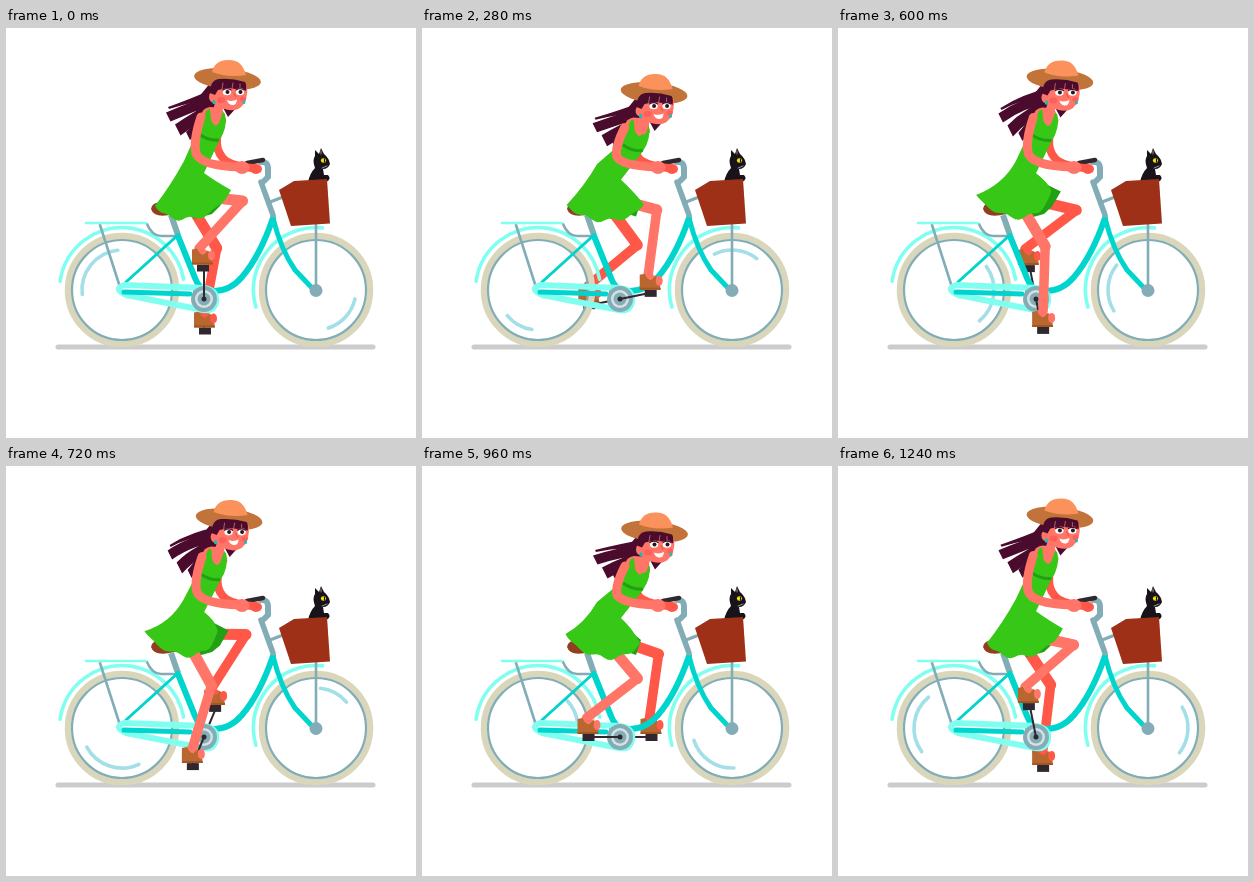
An HTML page with a canvas for the animation above (1280 ms loop, 410 px wide and 410 px high).

```html
<!DOCTYPE html>
<html>
<head>
<meta charset="utf-8">
<style>
html, body { margin: 0; width: 100%; height: 100%; overflow: hidden; background: #fff; }
canvas { display: block; }
</style>
</head>
<body>
<canvas id="stage" width="410" height="410"></canvas>
<script>
const ctx = document.getElementById('stage').getContext('2d');
const LOOP = 1280, STEP = 40, TAU = Math.PI * 2;
const TEAL = '#00d5cd', AQUA = '#80fff0', STEEL = '#82adb6', DARK = '#30272f';
const SKIN = '#ff7668', FAR_SKIN = '#ff5748', GREEN = '#37c716', SHADE = '#20a012';
const HAIR = '#4b0b2c', BROWN = '#b9672f';
const hub = { x: 198, y: 271 };

function fill(color, d) {
  ctx.fillStyle = color;
  ctx.fill(new Path2D(d));
}
function line(color, width, d, cap = 'round') {
  ctx.strokeStyle = color;
  ctx.lineWidth = width;
  ctx.lineCap = cap;
  ctx.lineJoin = 'round';
  ctx.stroke(new Path2D(d));
}
function oval(color, x, y, rx, ry = rx, turn = 0) {
  ctx.fillStyle = color;
  ctx.beginPath();
  ctx.ellipse(x, y, rx, ry, turn, 0, TAU);
  ctx.fill();
}
function arc(color, width, x, y, r, from, to) {
  ctx.strokeStyle = color;
  ctx.lineWidth = width;
  ctx.lineCap = 'round';
  ctx.beginPath();
  ctx.arc(x, y, r, from * TAU / 360, to * TAU / 360);
  ctx.stroke();
}
function shifted(x, y, draw) {
  ctx.save();
  ctx.translate(x, y);
  draw();
  ctx.restore();
}
const wave = (t, period, peak = 0) => Math.cos(TAU * (t - peak) / period);

function wheel(x, end, length) {
  arc('#d9d6bc', 6.5, x, 262, 54, 0, 360);
  arc(STEEL, 2.2, x, 262, 50, 0, 360);
  arc('#a3dfe8', 3.6, x, 262, 40, end - length, end);
}

// Two-bone leg: the ankle follows the pedal, the knee bends forward.
function leg(angle, hipX, hipY, color) {
  const thigh = 61, shin = 64.5, crank = 31.5;
  const px = hub.x + crank * Math.sin(angle), py = hub.y - crank * Math.cos(angle);
  const ax = px - 2 - 3 * Math.cos(angle), ay = py - 19;
  const dx = ax - hipX, dy = ay - hipY, dist = Math.hypot(dx, dy);
  const bend = Math.acos((thigh ** 2 + dist ** 2 - shin ** 2) / (2 * thigh * dist));
  const dir = Math.atan2(dy, dx) - bend;
  const kx = hipX + thigh * Math.cos(dir), ky = hipY + thigh * Math.sin(dir);
  line(DARK, 2, `M${hub.x} ${hub.y}L${px} ${py}`);
  line(color, 11, `M${hipX} ${hipY}L${kx} ${ky}`);
  line(color, 9.5, `M${kx} ${ky}L${ax} ${ay}`);
  shifted(px - Math.cos(angle), py, () => {
    fill(DARK, 'M-6 -3H6V4H-6Z');
    line(color, 9, 'M-3 -16L5 -11');
    fill(BROWN, 'M-11 -3L-11 -18L-6 -19Q-3 -12 1 -13L5 -17Q9 -12 10 -3Z');
    oval(color, 8.5, -12, 3.5, 5);
    line('#a25525', 2, 'M-10 -4H9');
  });
}

function bike() {
  arc(AQUA, 3.6, 116, 262, 62.5, 188, 350);
  arc(AQUA, 3.6, 310, 262, 62.5, 164, 276);
  line(STEEL, 2.6, 'M94 197L113 256M141 196Q146 208 155 208H168M310 196V262');
  line(AQUA, 2.6, 'M80 195H140');
  line(STEEL, 6, 'M165 187L172 207', 'butt');
  line(TEAL, 3, 'M120 254L172 207');
  line(TEAL, 6, 'M172 208L189 250Q193 261 202 263');
  line(TEAL, 6, 'M267 190Q254 228 236 249Q224 263 208 263H190');
  line(TEAL, 5, 'M267 190Q275 222 289 242L307 261');
  oval(STEEL, 310, 262.5, 6.5);
  line(STEEL, 3, 'M264 174L277 169');
  line(STEEL, 5.5, 'M255 154L267 187');
  line(STEEL, 6, 'M255 134Q262 133 262 141V149L258 153');
  line(DARK, 4.5, 'M241 135L257 132');
  fill('#91401f', 'M145 181Q146 174 156 174L184 178Q182 186 168 186Q148 191 145 181Z');
  line(AQUA, 6, 'M118 257L198 260Q212 262 210 274Q208 284 197 282L120 267Q107 261 118 257Z');
  line(TEAL, 5, 'M118 264L184 266');
  oval(STEEL, hub.x, hub.y, 13);
  oval('#d6e1e3', hub.x, hub.y, 9);
  oval(STEEL, hub.x, hub.y, 6.5);
  oval(DARK, hub.x, hub.y, 2.5);
}

function catInBasket() {
  fill('#18131b', 'M302 154Q304 145 309 140Q306 132 309 128V122L313 126L315 120L318 126Q323 130 324 136Q322 141 317 141L318 147H322Q326 151 320 154Z');
  line('#d8a49b', .8, 'M315 123V126');
  oval('#f5e600', 317.5, 132.5, 2.6, 2.2);
  line('#18131b', 1.2, 'M318.5 131V134');
  line('#eee', .6, 'M321 138L316 140');
  fill('#9d3016', 'M273 162L288 153L321 151L324 195.5L285 198Z');
}

function hair(t, u, hx, hy) {
  const swing = -3.2 * (1 - wave(t, 640)) + 3 * wave(t, LOOP, 320);
  const curl = 7 * Math.max(0, wave(t, LOOP, 720));
  // Each lock: tip x, tip y, tip thickness, root y.
  const locks = [[162, 80, 2, 64], [160, 89, 9, 69], [169, 102, 11, 76], [180, 108, 8, 82]];
  shifted(hx, hy, () => {
    for (const [x, y, w, root] of locks) {
      const ty = y + swing, mx = (x + 207) / 2, my = (ty + root) / 2 - curl;
      fill(HAIR, `M212 ${root - 5}Q${mx} ${my - w / 2} ${x} ${ty - w / 2}` +
        `L${x + w / 2} ${ty + w / 2}Q${mx + 4} ${my + w / 2} 212 ${root + 6}Z`);
    }
    fill(HAIR, 'M205 54L192 70L190 85L205 84L214 70ZM214 74L231 79L222 89Z');
  });
}

function skirtHem(t, front, back) {
  let d = '';
  for (let i = 1; i <= 24; i++) {
    const p = i / 24, q = 1 - p;
    const ripple = 2.2 * Math.sin(p * TAU * 3.5 + t / LOOP * TAU) * Math.sin(p * Math.PI);
    const at = (a, b, c, e) => q ** 3 * a + 3 * q * q * p * b + 3 * q * p * p * c + p ** 3 * e;
    d += `L${at(front[0], 205, 160, back[0])} ${at(front[1], 200, 196, back[1]) + ripple}`;
  }
  return d;
}

function dress(t, u) {
  const x = 8 * u, y = 11 * u;
  const back = [143.5 + 5.5 * wave(t, LOOP), 172 + 7 * wave(t, LOOP, 120)];
  const front = [225 - 3 * u - 13 * Math.max(0, wave(t, LOOP, 700)), 162 + 15 * u];
  shifted(x, y, () => {
    fill(SKIN, 'M195 88Q196 80 204 79L216 80L220 91L214 102H200Z');
  });
  fill(GREEN, `M${201 + x} ${82 + y}L${204 + x} ${81 + y}L${205 + x} ${92 + y}` +
    `Q${209 + x} ${101 + y} ${213 + x} ${95 + y}L${217 + x} ${84 + y}` +
    `L${219 + x} ${86 + y}Q${222 + x} ${100 + y} ${213 + x} ${113 + y}L${198 + u} ${145 + 7 * u}` +
    `Q${209 + u} ${153 + 9 * u} ${front[0]} ${front[1]}` + skirtHem(t, front, back) +
    `Q${165 - 2 * u} 157 ${178 - 3 * u} ${133 + 3 * u}L${190 + x} ${106 + y}Z`);
  line(SHADE, 3, `M${193 + x} ${106 + y}Q${202 + x} ${113 + y} ${213 + x} ${112 + y}`, 'butt');
}

function head() {
  oval('#c1733a', 221.5, 51, 33.5, 10.5, .1);
  fill('#fb925b', 'M206 44Q209 32 222 32Q236 31 240 47Q222 50 206 44Z');
  line(SKIN, 9, 'M214 74L210 88');
  fill(SKIN, 'M206 56L241 57Q243 73 234 80Q226 85 214 79L207 72Z');
  oval(SKIN, 207.5, 69, 4.5, 5.5);
  oval('#ff5f58', 215, 72, 4, 3);
  oval('#ff5f58', 237, 71, 3, 2.5);
  fill(HAIR, 'M204 65Q204 52 213 51Q226 50 239 54Q241 57 240 63L236 60L230 61L222 60L212 62L209 67Z');
  line('#c4776f', .8, 'M217 55L216 61M227 55L226 61M234 56V61');
  for (const x of [221, 234]) {
    oval('#fff', x, 64, 4.2, 3.3);
    oval('#241822', x + .5, 64, 2);
    line(HAIR, 1.2, `M${x - 4} 62Q${x} 59.5 ${x + 4} 62`);
  }
  line('#e94d42', 1, 'M228 65L230 69');
  fill('#fff', 'M221 72Q226 74 231 71.5Q230.5 77.5 226 77Q222 76.5 221 72Z');
  oval('#26b8b6', 208, 74, 1.7, 2.2);
  oval('#26b8b6', 238, 74, 1.5, 2);
}

function draw(t) {
  const u = (1 - wave(t, 640)) / 2;
  const crank = TAU * t / LOOP, spin = 1080 * t / LOOP;
  const sx = 8 * u, sy = 11 * u;
  const hx = 11 * u, hy = 14.5 * u;
  ctx.fillStyle = '#fff';
  ctx.fillRect(0, 0, 410, 410);
  line('#ccc', 5, 'M52 319H367');

  leg(crank + Math.PI, 179, 168, FAR_SKIN);
  wheel(116, 264 + spin, 64 + 27 * wave(t, 640, 20));
  wheel(310, 72 + spin, 67 + 27 * wave(t, 640, 450));
  bike();
  catInBasket();

  hair(t, u, hx, hy);
  line(FAR_SKIN, 8, `M${216 + sx} ${93 + sy}Q${204 + sx / 2} ${120 + sy / 2} 220 133Q230 139 247 140`);
  oval(FAR_SKIN, 250, 141, 6, 5);

  const tipX = 223 - 4 * u, tipY = 163 + 11 * u;
  fill(SHADE, `M196 ${150 + 5 * u}L${tipX} ${tipY}L214 ${tipY + 15}L206 186L188 191L184 180Z`);
  leg(crank, 176, 166, SKIN);
  dress(t, u);
  line(SKIN, 9, `M${195 + sx} ${89 + sy}Q${187 + sx * .8} ${113 + sy * .5} ${190 + sx * .6} ${125 + sy * .3}` +
    `Q${194 + sx * .6} 138 235 139`);
  oval(SKIN, 236, 139.5, 7.5, 6.5);
  shifted(hx, hy, head);
}

function tick(now) {
  draw(Math.floor(now % LOOP / STEP) * STEP);
  requestAnimationFrame(tick);
}
draw(0);
requestAnimationFrame(tick);
</script>
</body>
</html>
```
